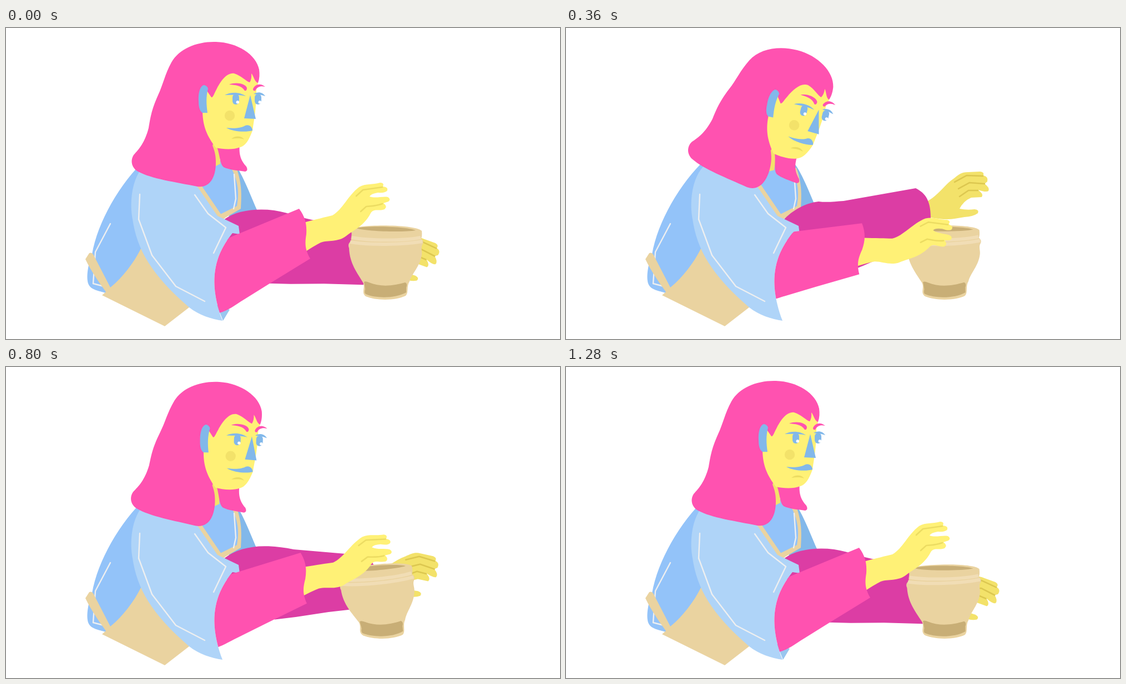
An HTML page with a canvas that plays this animation: 998 by 561 pixels, repeating every 1320 ms.

```html
<!DOCTYPE html>
<html lang="en">
<head>
<meta charset="utf-8">
<title>Potter</title>
<style>
  html, body { margin: 0; width: 100%; height: 100%; overflow: hidden; background: #fff; }
  canvas { display: block; width: 100vw; height: 100vh; }
</style>
</head>
<body>
<canvas id="stage" width="998" height="561"></canvas>
<script>
const ctx = document.getElementById('stage').getContext('2d');
const LOOP = 1320, STEP = 40;
const PINK = '#ff52b0', MAGENTA = '#dc3da4', SKIN = '#fff176', SKIN_SHADE = '#f3e26a';
const SKIN_LINE = '#ecdc62', SHADE_LINE = '#dcc750', SKY = '#93c3f9', PALE = '#afd4f8';
const STEEL = '#82b8ea', TAN = '#ead3a0', TAN_LIGHT = '#f1ddb5', TAN_DARK = '#c8ae76', STITCH = '#eeeff0';
// Front edge of the vest, from its tip up to the shoulder.
const HEM = '390,528 C361,450 380,405 408,370';

// Every path point passes through the current map.
const still = (x, y) => [x, y];
let map = still;

const lerp = (a, b, k) => a + (b - a) * k;
const clamp = v => Math.min(1, Math.max(0, v));

function turn(px, py, degrees, dx = 0, dy = 0) {
  const a = degrees * Math.PI / 180, c = Math.cos(a), s = Math.sin(a);
  return (x, y) => [
    px + (x - px) * c - (y - py) * s + dx,
    py + (x - px) * s + (y - py) * c + dy
  ];
}

function trace(d) {
  return new Path2D(d.replace(/(-?[\d.]+),(-?[\d.]+)/g, (_, x, y) => map(+x, +y).join(',')));
}

function fill(color, d) {
  ctx.fillStyle = color;
  ctx.fill(trace(d));
}

function line(color, width, d, cap = 'round') {
  ctx.strokeStyle = color;
  ctx.lineWidth = width;
  ctx.lineCap = cap;
  ctx.lineJoin = 'round';
  ctx.stroke(trace(d));
}

function dot(color, x, y, r) {
  line(color, r * 2, `M${x},${y} L${x + 0.02},${y}`);
}

function drawTorso() {
  fill(SKY, 'M252,236 C205,280 165,350 155,408 C145,435 145,455 149,463 C155,474 170,474 182,479 L260,440 L300,300 Z');
  line(STITCH, 2.4, 'M188,353 L161,404 L157,461 L176,466');
  fill(STEEL, 'M408,240 C424,258 438,296 452,328 L448,345 L400,345 L412,300 Z');
  fill(SKY, 'M340,270 L372,238 L408,240 L420,290 L418,328 L384,342 Z');
  fill(TAN, 'M407,255 C421,283 419,305 416,321 L384,337 L392,344 L423,326 C425,295 424,278 415,252 Z');
  line(STITCH, 2.4, 'M411,264 L414,308 L410,326');
}

function drawVest() {
  fill(TAN, 'M143,417 L150,406 Q155,404 158,410 L188,468 C210,450 230,424 243,398 L300,440 L335,500 L286,538 L173,482 L180,476 C165,455 153,438 143,417 Z');
  fill(TAN, 'M340,270 L352,284 L388,337 L395,343 L385,347 L340,300 Z');
  fill(PALE, `M252,245 C224,270 223,320 228,345 C236,400 262,445 330,504 C348,518 370,525 ${HEM} L421,372 L419,357 L396,346 L381,339 L346,288 L300,240 Z`);
  line(STITCH, 2.4, 'M241,300 L239,345 L263,410 L306,466 L358,493');
  line(STITCH, 2.4, 'M340,301 L364,335 L396,360 L374,406');
}

function drawBackArm(lift) {
  const down = 1 - lift / 0.944;
  const rigid = turn(460, 395, 23.1 * down, -3 * down, 6 * down);
  const at = (x, y) => rigid(x, y).join(',');

  map = rigid;
  fill(SKIN_SHADE, 'M648,314 C672,302 680,284 698,272 C708,264 712,260 724,260 L746,259 Q754,260 752,266 Q761,268 759,277 L754,281 Q764,288 761,294 Q757,297 742,292 Q753,299 749,305 L730,306 Q716,312 709,326 Q722,329 736,327 Q745,328 742,334 Q734,340 718,341 L700,344 Q685,347 657,342 Z');
  line(SHADE_LINE, 2.6, 'M700,278 L722,266 L751,267');
  line(SHADE_LINE, 2.6, 'M707,290 L727,279 L754,281');
  line(SHADE_LINE, 2.6, 'M709,304 L725,293 L742,293');

  map = still;
  const cx = lerp(455, 483, down), cy = lerp(313, 329, down);
  fill(MAGENTA, `M392,346 C${lerp(408, 415, down)},329 ${lerp(430, 450, down)},${lerp(316, 325, down)} ${cx},${cy}
    C${at(470, 315)} ${at(484, 313)} ${at(500, 312)} L${at(630, 289)}
    C${at(648, 298)} ${at(657, 312)} ${at(657, 342)} L${at(656, 379)}
    L${at(590, 405)} L${at(535, 429)} L${at(500, 443)} L420,430 L392,370 Z`);
}

function drawPot(lean) {
  map = (x, y) => [
    x - lean * (529 - y),
    y + lean * (683 - x) * clamp((489 - y) / 124)
  ];
  fill(TAN, 'M621,364 C626,354 735,353 749,366 Q750,374 748,380 Q754,385 750,391 C747,396 750,403 749,409 C746,430 731,443 727,457 C721,466 726,477 720,483 C702,492 666,492 648,484 C639,477 648,469 643,459 C633,442 619,425 618,397 C615,390 619,386 622,384 C620,378 625,374 621,364 Z');
  fill(TAN_DARK, 'M631,361 C652,356 722,358 738,365 C717,369 645,367 631,361 Z');
  line(TAN_LIGHT, 6, 'M623,378 C655,384 717,384 747,378', 'butt');
  line(TAN_LIGHT, 6, 'M620,386 C655,392 715,391 750,385', 'butt');
  fill(TAN_DARK, 'M645,458 Q648,456 654,459 C675,468 699,465 719,459 Q724,461 721,468 L721,477 C702,488 666,488 648,480 Q645,478 647,471 Z');
  map = still;
}

function drawFrontArm(lift) {
  if (lift < 0.33) fill('#99c6ef', `M380,500 L${403 - 55 * lift},508 L391,528 Z`);

  ctx.save();
  ctx.clip(trace(`M390,561 L${HEM} L430,345 L430,0 L998,0 L998,561 Z`));
  map = turn(434, 358, 16.4 * lift);
  fill(SKIN, 'M536,351 C560,345 575,341 588,338 C606,328 616,302 636,287 C648,280 660,283 674,279 Q682,279 679,286 Q689,287 687,293 Q684,298 670,297 Q657,299 655,304 C666,308 678,303 688,305 Q694,309 689,313 L680,316 Q688,322 682,327 C670,331 663,325 657,334 C645,357 627,364 613,375 C598,387 580,382 567,387 Q555,393 537,405 Z');
  line(SKIN_LINE, 2.6, 'M631,303 L643,292 L678,287');
  line(SKIN_LINE, 2.6, 'M639,331 L649,322 C660,321 668,321 678,317');
  fill(PINK, 'M340,404 L528,326 C540,342 542,356 541,372 C538,390 539,400 548,416 L478,459 L430,489 C412,500 400,510 384,514 L330,520 Z');
  map = still;
  ctx.restore();
}

function drawEye(x, y) {
  line(STEEL, 12, `M${x},${y - 3} L${x},${y + 4}`);
  dot('#fff', x + 3.3, y + 5.8, 2.7);
}

function drawHead(nod) {
  map = turn(331, 202, 13 * nod);
  fill(SKIN_SHADE, 'M366,200 L384,212 L386,245 L376,250 Z');
  fill(PINK, 'M380,214 L421,210 C419,230 424,240 433,250 Q437,257 431,259 C418,257 402,256 392,251 C385,245 386,232 380,214 Z');
  fill(PINK, 'M378,25 C345,24 312,37 298,62 C286,84 283,102 274,121 C261,150 260,164 257,180 C250,207 240,218 230,229 C223,240 227,253 238,259 C262,272 305,278 345,286 C368,289 378,268 378,243 C378,230 376,222 372,212 L390,160 L454,99 C457,91 457,83 456,75 C451,48 417,26 378,25 Z');
  fill(SKIN, 'M361,112 L370,125 C373,126 375,118 379,111 C387,95 398,80 411,82 C424,86 432,96 439,98 Q443,92 442,82 C446,86 448,98 454,99 L451,112 C452,135 447,165 444,185 C438,202 431,213 422,215 C410,220 391,219 378,216 C362,195 354,177 354,148 Z');
  fill(STEEL, 'M347,132 C346,112 352,103 357,103 Q362,104 364,109 C360,125 361,138 363,153 L354,153 Q347,149 347,132 Z');

  dot(SKIN_SHADE, 403, 158, 9.2);
  fill(PINK, 'M402,102 C414,97 431,100 434,108 Q434,114 430,113 C424,103 413,103 402,102 Z');
  fill(PINK, 'M445,110 C448,102 458,98 467,106 C459,104 452,106 449,113 Q445,114 445,110 Z');
  drawEye(414, 128);
  drawEye(454, 128);
  fill(STEEL, 'M394,121 C405,115 421,115 432,123 C420,120 406,121 394,121 Z');
  fill(STEEL, 'M446,119 C454,114 463,116 467,123 C459,120 453,120 446,119 Z');
  fill(STEEL, 'M440,121 L429,163 L450,164 Z');
  fill(STEEL, 'M397,180 C412,182 425,180 431,176 C438,173 444,179 444,185 C434,188 410,188 397,180 Z');
  fill(SKIN_LINE, 'M406,200 C413,194 424,194 429,201 C421,198 414,199 406,200 Z');
  map = still;
}

function armLift(t) {
  return t < 320 ? t / 320 : clamp((1040 - t) / 720);
}

function headNod(t) {
  return clamp(t / 280) - clamp((t - 600) / 240);
}

function potLean(t) {
  if (t < 960) return 0.11 * (1 - Math.abs((t % 320) / 160 - 1));
  return 0.11 * (t < 1160 ? (t - 960) / 200 : (1320 - t) / 160);
}

function draw(now) {
  const t = Math.floor((now % LOOP) / STEP) * STEP;
  const lift = armLift(t);
  ctx.fillStyle = '#fff';
  ctx.fillRect(0, 0, 998, 561);
  drawTorso();
  drawBackArm(lift);
  drawPot(potLean(t));
  drawVest();
  drawFrontArm(lift);
  drawHead(headNod(t));
}

let start;
function tick(now) {
  start ??= now;
  draw(now - start);
  requestAnimationFrame(tick);
}
draw(0);
requestAnimationFrame(tick);
</script>
</body>
</html>
```
